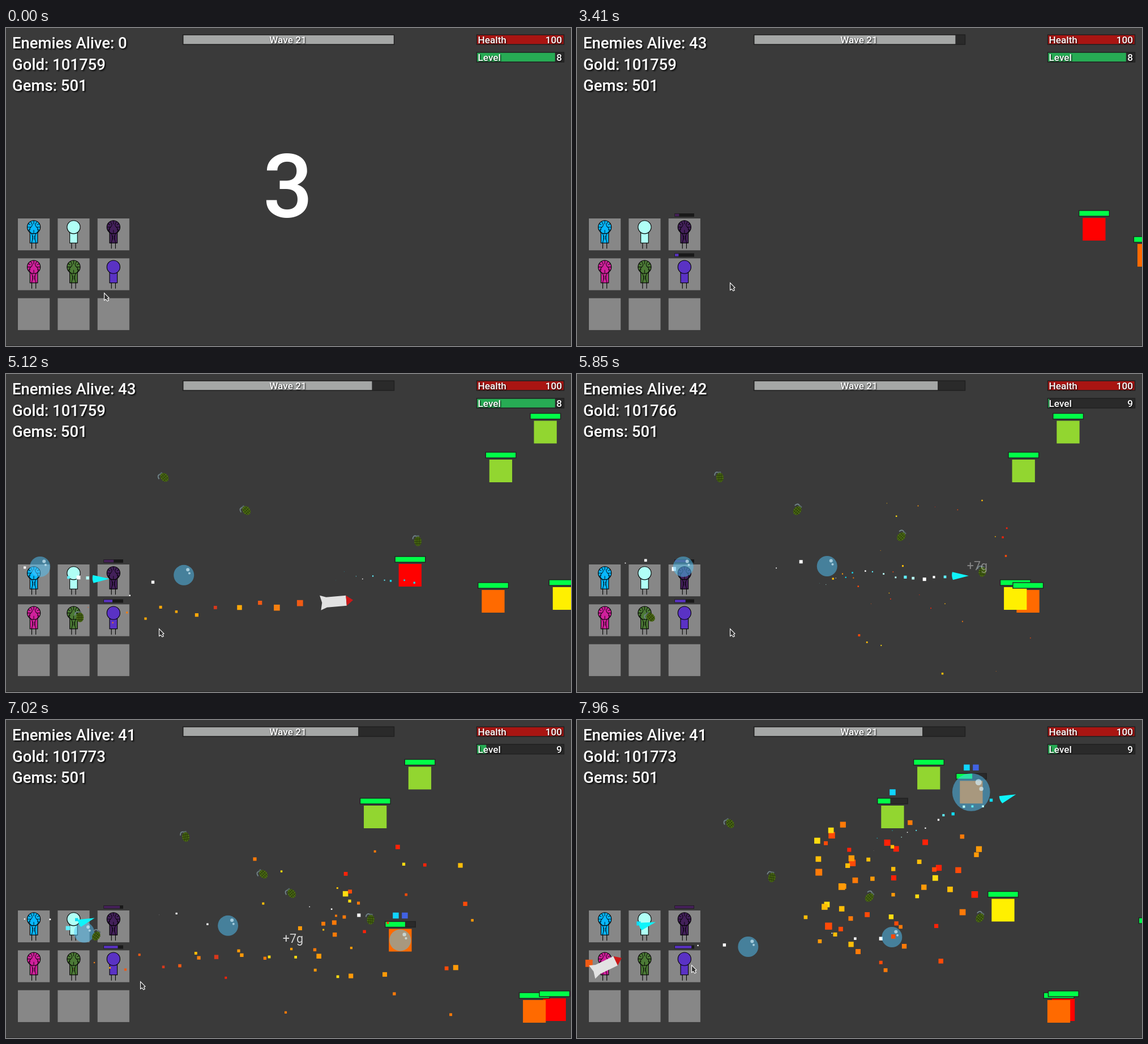
Write an HTML page that moves like this. It is 998 px wide and 561 px high and loops after 8 s.

```html
<!DOCTYPE html>
<html lang="en">
<head>
<meta charset="utf-8">
<title>Wave 21</title>
<style>
  html, body { margin: 0; width: 100%; height: 100%; overflow: hidden; background: #3a3a3a; }
  svg { display: block; width: 100%; height: 100%; }
  text { font-family: Roboto, sans-serif; font-weight: 500; fill: #fff; }
  .stats { font-size: 27.5px; filter: drop-shadow(2px 2px 1px #000c); }
  .labels { font-size: 17.2px; filter: drop-shadow(1px 1px 1px #000); }
  .count { font-size: 156px; text-anchor: middle; }
  .gain { font-size: 21.5px; font-weight: 400; text-anchor: middle; }
</style>
</head>
<body>
<svg viewBox="0 0 998 561">
  <defs>
    <g id="lines" fill="none" stroke="#000" stroke-opacity=".8">
      <path d="M-11.6 -11H-5M5 -11H11.6M0 -22.6V-16M0 -6V0M-6 -21Q0 -15 -5 -11T-6 -1M6 -21Q0 -15 5 -11T6 -1M-10 -17L-6 -15M10 -17L6 -15M-10 -5L-6 -7M10 -5L6 -7"/>
      <path d="M-4 0Q0 7 -4 17M4 0Q0 7 4 17M-1.5 4V11M1.5 4V11"/>
    </g>
    <g id="grenade">
      <path d="M-2 -8Q-8 -11 -9 -3" fill="none" stroke="#71858a" stroke-width="1.8"/>
      <rect x="-3" y="-9.5" width="5.5" height="4" fill="#58696a"/>
      <ellipse cy="1" rx="6.5" ry="8.5" fill="#4b6a14"/>
      <path d="M-6 -3H6M-6.5 1H6.5M-6 5H6M-3 -6V8M0 -7V9M3 -6V8" stroke="#26380a" stroke-width=".9"/>
    </g>
    <g id="rocket">
      <path d="M-28 -13L-17 -9H18V9H-17L-28 13L-25 0Z" fill="#e2e2e2"/>
      <path d="M18 -9L30 0L18 9Z" fill="#cc1818"/>
    </g>
    <path id="spike" d="M-14 -7Q-16 0 -13 7L15 0Z" fill="#0ff4fa"/>
    <g id="bubble">
      <circle r="18" fill="#52c6fc" opacity=".5"/>
      <g fill="#d8f4ff" opacity=".65"><circle cx="7" cy="-9.5" r="3"/><circle cx="9.7" cy="-3.2" r="2"/></g>
    </g>
  </defs>
  <rect width="998" height="561" fill="#3a3a3a"/>
  <rect y="560" width="998" height="1" fill="#2a2a2a"/>
  <g id="towers"></g>
  <g id="scene"></g>
  <g fill="#2a2a2a" stroke="#202020" stroke-width="1.5">
    <rect x="312.5" y="12" width="373" height="17"/>
    <rect x="831.5" y="12" width="154" height="17" fill="#a91512"/>
    <rect x="831.5" y="43" width="154" height="17"/>
  </g>
  <rect id="waveBar" x="313.5" y="12.8" height="15.4" fill="#a5a7a6"/>
  <rect id="levelBar" x="832.3" y="43.8" height="15.4" fill="#27ab54"/>
  <g class="stats">
    <text id="alive" x="11" y="36"></text>
    <text id="gold" x="11" y="73.5"></text>
    <text x="11" y="111">Gems: 501</text>
  </g>
  <g class="labels">
    <text x="498" y="26.7" text-anchor="middle">Wave 21</text>
    <text x="833.5" y="26.7">Health</text>
    <text x="982" y="26.7" text-anchor="end">100</text>
    <text x="833.5" y="57.8">Level</text>
    <text id="level" x="982" y="57.8" text-anchor="end"></text>
  </g>
  <text id="count" class="count" x="498" y="333"></text>
  <path id="cursor" d="M.5 .5V13.5L3.2 11.5L6 14.8L8.3 13.6L6.4 10.3L9 9Z" fill="#333" stroke="#fff" stroke-width="1.1"/>
</svg>
<script>
const LOOP = 8000, START = 2165, KILLS = [5177, 6776];
const $ = id => document.getElementById(id);
const clamp = v => Math.max(0, Math.min(1, v));
const smooth = v => { const u = clamp(v); return u * u * (3 - 2 * u); };
const settle = v => 1 - Math.exp(-v);
const rnd = n => { const s = Math.sin(n * 127.1 + 11.7) * 43758.5453; return s - Math.floor(s); };
const pick = (list, n) => list[Math.floor(rnd(n) * list.length)];

const rect = (x, y, w, h, c, more = '') =>
  `<rect x="${x.toFixed(2)}" y="${y.toFixed(2)}" width="${w.toFixed(2)}" height="${h.toFixed(2)}" fill="${c}" ${more}/>`;
const square = (x, y, s, c) => rect(x - s / 2, y - s / 2, s, s, c);
const put = (id, [x, y], deg = 0, k = 1) =>
  `<use href="#${id}" transform="translate(${x.toFixed(2)} ${y.toFixed(2)}) rotate(${deg.toFixed(1)}) scale(${k.toFixed(3)})"/>`;

// Enemies walk left from the right edge; a chill halves the speed, a trap lifts them in a bubble.
const RED = { c: '#f00', v: .1167 }, ORANGE = { c: '#ff6a00', v: .0875 };
const YELLOW = { c: '#fff000', v: .29 }, GREEN = { c: '#92d630', v: .1167 };
const enemies = [
  { ...RED, enter: 2512, y: 335, end: KILLS[0] },
  { ...ORANGE, enter: 3318, y: 381, chill: 6990, trap: 7000, hits: { 6720: .66, 7700: .53 } },
  { ...GREEN, enter: 3884, y: 151, chill: 7704, hits: { 7250: .79, 7704: .42 } },
  { ...GREEN, enter: 4559, y: 82.5 },
  { ...YELLOW, enter: 5009, y: 376, end: KILLS[1] },
  { ...RED, enter: 6597, y: 491 },
  { ...ORANGE, enter: 6050, y: 494 },
  { ...YELLOW, enter: 7044, y: 315.5 },
  { ...RED, enter: 7968, y: 362 }
];

function place(e, t) {
  const walked = Math.min(t, e.trap || LOOP) - e.enter - Math.max(0, Math.min(t, e.trap || LOOP) - (e.chill || LOOP)) / 2;
  const held = Math.max(0, t - (e.trap || LOOP));
  return [998 - walked * e.v, e.y - held * .258 - 26 * settle(held / 60)];
}

function drawEnemies(t) {
  let bodies = '', bars = '', marks = '', cages = '';
  for (const e of enemies) {
    if (t < e.enter - 80 || t >= (e.end || LOOP)) continue;
    const [x, y] = place(e, t);
    let health = 1;
    for (const at in e.hits) if (t >= at) health = e.hits[at];
    bodies += rect(x, y, 40.3, 40, e.c);
    bars = rect(x - 6.5, y - 13, 53.5, 10, '#2a2a2a', 'stroke="#222" stroke-width="1.4"') +
      rect(x - 5.8, y - 12.3, 52.2 * health, 8.6, '#00ff48') + bars;
    const icons = [t >= e.chill && '#10d4ff', t >= e.trap && '#4162e2'].filter(Boolean);
    icons.forEach((c, i) => { marks += square(x + 20.2 + (i - (icons.length - 1) / 2) * 16, y - 23.5, 10.5, c); });
    if (t >= e.trap) cages += put('bubble', [x + 20, y + 20], 0, 1 + .89 * settle((t - e.trap) / 300));
  }
  return bodies + bars + marks + cages;
}

// Every weapon fires at a fixed rhythm; at(i, age) is the place of shot i.
const line = (x, y, deg, d) => [x + d * Math.cos(deg * Math.PI / 180), y + d * Math.sin(deg * Math.PI / 180)];
const bubblePaths = [[384, 339, 250], [340, 383, 340], [345, 400, 85], [362, 362, 0]]; // from y, to y, where
const spikeAim = [0, -.6, 3.3, -19.4, -16];
const rocketAim = [-3.5, -2.2, -24];
const lobs = [[.54, 0], [.4, 0], [.403, -8], [.355, 0], [.335, -8], [.32, 0], [.4, 20], [.42, 12], [.38, 30], [.33, 50], [.476, 0]]; // speed, dip

const weapons = [
  {
    id: 'bubble', first: 3602, every: 1454, life: [3400, 4000, 4000, 4000],
    at(i, age) {
      const [from, to, mid] = bubblePaths[i], d = age * .1747;
      return [49 + d, from + (to - from) * smooth((d - mid + 75) / 150)];
    },
    turn: () => 0,
    trail: { every: 260, life: 720, min: 4, grow: 4, spread: 20, back: -14, colors: ['#fff'] }
  },
  {
    id: 'spike', first: 4085, every: 967, life: [880, 880, 620, 1500, 1500],
    at: (i, age) => line(120, 362, spikeAim[i], age * .698),
    turn: i => spikeAim[i],
    trail: { every: 25, life: 390, min: 4, grow: 4, spread: 15, back: -12, colors: ['#fff', '#b8fff8', '#60f0ff', '#10dcf4'] }
  },
  {
    id: 'rocket', first: 4070, every: 1941, life: [1107, 766, 1500],
    at: (i, age) => line(49, 434, rocketAim[i], age * .39 + age * age * .000114),
    turn: i => rocketAim[i] - 1.5,
    trail: { every: 62, life: 850, min: 9, grow: 4, spread: 20, back: -28, colors: ['#d8381c', '#f05a14', '#f57f10', '#ffa808'] }
  },
  {
    id: 'grenade', first: 3995, every: 365, life: lobs.map(() => 1700),
    at(i, age) {
      const [speed, dip] = lobs[i];
      return [120 + age * speed,
        434 - 256 * smooth(age / 340) + Math.max(0, age - 340) * .148 + dip * clamp(age / 700)];
    },
    turn: (i, age) => Math.sin(age / 180 + i) * 48
  }
];

function drawTrail(w, i, age) {
  const o = w.trail;
  let s = '';
  for (let te = 0, n = i * 900 + w.first; te < Math.min(age, w.life[i]); te += o.every, n += 7) {
    const old = (age - te) / o.life;
    if (old >= 1) continue;
    const [x, y] = w.at(i, te), spread = o.spread * (.3 + .7 * old);
    s += square(x + o.back + (rnd(n) - .5) * spread, y + (rnd(n + 1) - .5) * 2 * spread,
      (o.min + rnd(n + 2) * o.grow) * (1 - old), pick(o.colors, n + 3));
  }
  return s;
}

function drawShots(t) {
  let s = '';
  for (const w of weapons) w.life.forEach((life, i) => {
    const age = t - w.first - i * w.every;
    if (age < 0) return;
    if (w.trail) s += drawTrail(w, i, age);
    if (age < life) s += put(w.id, w.at(i, age), w.turn(i, age));
  });
  return s;
}

const FIRE = ['#ff2208', '#ff4a08', '#ff7a08', '#ff9a08', '#ffbe08', '#ffdc10'];
const bursts = [
  { t0: KILLS[0], x: 650, y: 368, count: 50, life: 880 },
  { t0: 6720, x: 705, y: 385, count: 26, life: 720 },
  { t0: KILLS[1], x: 500, y: 385, count: 20, life: 480 },
  { t0: 7745, x: 560, y: 298, count: 58, life: 850 }
];
function drawBurst({ t0, x, y, count, life }, t) {
  const age = t - t0;
  let s = '';
  if (age < 0) return s;
  for (let i = 0; i < count; i++) {
    const n = t0 + i * 5, a = rnd(n) * Math.PI * 2;
    const r = Math.sqrt(rnd(n + 1)) * 205 * settle(age / 120);
    const left = 1 - age / (life * (.65 + .35 * rnd(n + 2)));
    if (left > 0) s += square(x + Math.cos(a) * r, y + Math.sin(a) * r * .87, (9 + rnd(n + 3) * 8) * left, pick(FIRE, n + 4));
  }
  return s;
}

function drawGain(t0, x, y, t) {
  const age = t - t0;
  return age < 0 || age > 1100 ? '' :
    `<text class="gain" x="${x}" y="${y - age * .03}" opacity="${1 - age / 1100}">+7g</text>`;
}

const charge = (y, c, span, t) => rect(172.3, y, 34.7, 6, '#191919') +
  rect(173, y + .8, 33.3 * clamp((t - 2130) / span), 4.4, c);

// start of move, then where it ends
const moves = [[50, 56, 501], [1160, 3, 515], [1320, 41, 490], [3200, 270, 449], [6300, 254, 456], [6750, 237, 461], [7790, 202, 432]];
function pointer(t) {
  let x = 173, y = 467;
  for (const [t0, tx, ty] of moves) {
    const u = smooth((t - t0) / 160);
    x += (tx - x) * u;
    y += (ty - y) * u;
  }
  return [x, y];
}

function draw(t) {
  const on = t >= START, kills = KILLS.filter(k => t >= k).length;
  $('alive').textContent = 'Enemies Alive: ' + (on ? 43 - kills : 0);
  $('gold').textContent = 'Gold: ' + (101759 + 7 * kills);
  $('level').textContent = kills ? 9 : 8;
  $('levelBar').setAttribute('width', kills ? 14 * kills - 12 : 137.5);
  $('waveBar').setAttribute('width', 371.3 - Math.max(0, t - 2130) * .01283);
  $('count').textContent = on ? '' : 3 - Math.floor((t + 832) / 1000);
  $('cursor').setAttribute('transform', `translate(${pointer(t)})`);
  $('scene').innerHTML = on ?
    charge(327, '#452059', 5800, t) + charge(397.5, '#5a32c4', 6650, t) +
    drawEnemies(t) + drawShots(t) + bursts.map(b => drawBurst(b, t)).join('') +
    drawGain(KILLS[0], 707, 366, t) + drawGain(KILLS[1], 507, 400, t) : '';
}

const skins = ['#08b8ff', '#b0fff6', '#43205a', '#d0209c', '#4c7a36', '#5a32c4'];
const plain = [1, 5];
let html = '';
for (let i = 0; i < 9; i++) {
  const x = 21 + (i % 3) * 70.35, y = 336 + Math.floor(i / 3) * 70.35;
  html += rect(x, y, 56.2, 56.2, '#878787');
  if (skins[i]) html += `<g transform="translate(${x + 28.1} ${y + 26.3})" fill="${skins[i]}" stroke="#000" stroke-width="1.1">
    <path d="M-3.6 17V27M3.6 17V27"/><rect x="-6.8" y="-1" width="13.6" height="18"/><circle cy="-11" r="11.6"/>
    ${plain.includes(i) ? '' : '<use href="#lines"/>'}</g>`;
}
$('towers').innerHTML = html;

let began;
function tick(now) {
  if (began === undefined) began = now;
  draw((now - began) % LOOP);
  requestAnimationFrame(tick);
}
draw(0);
requestAnimationFrame(tick);
</script>
</body>
</html>
```
